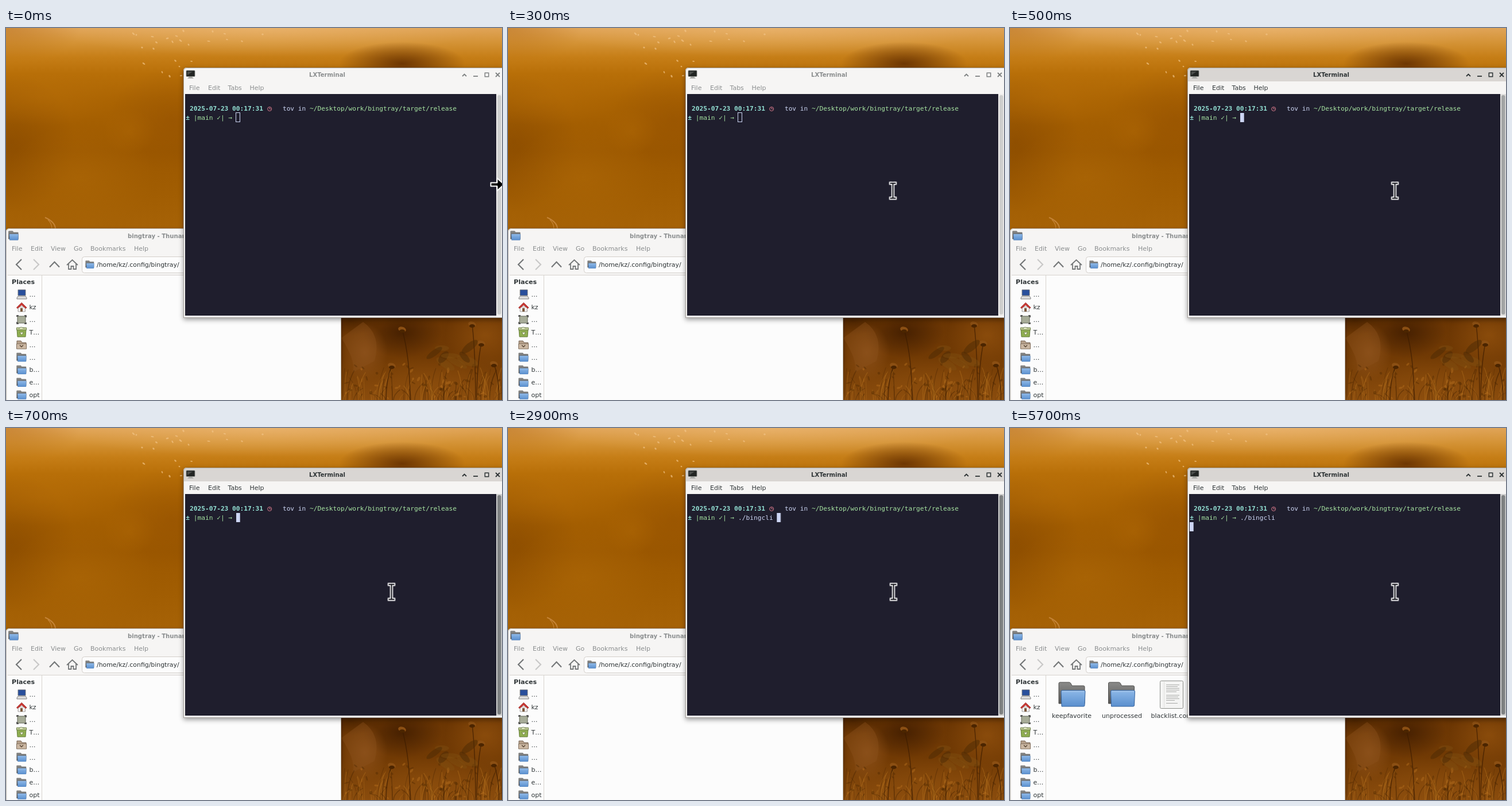
An HTML page with a canvas that plays this animation: 864 px wide and 648 px high, repeating every 8 s.

```html
<!DOCTYPE html>
<html lang="en">
<head>
<meta charset="utf-8">
<title>Desktop with terminal</title>
<style>
html, body { margin: 0; width: 100%; height: 100%; overflow: hidden; background: #a66003; }
canvas, svg { position: absolute; left: 0; top: 0; width: 864px; height: 648px; }
text { font: 11px "DejaVu Sans", sans-serif; fill: #2e3436; white-space: pre; }
.title { font-weight: bold; font-size: 10.1px; }
.head { font-weight: bold; font-size: 11.1px; }
.faded text { fill: #8b8e8f; }
.mono text { font: 11.2px "DejaVu Sans Mono", monospace; fill: #cdd6f4; }
.mono .cyan { fill: #94e2d5; font-weight: bold; }
.mono .green { fill: #a6e3a1; }
.thunar { filter: drop-shadow(0 2px 3px #0005); }
.terminal { filter: drop-shadow(0 3px 4px #0006); }

/* 1% = 80 ms */
.bar, .ink, .inkline, .trough, .slider, .block, .hollow, .start, .typed, .files, .arrow, .beam {
  animation: 8s step-end infinite;
}
.bar { animation-name: bar; }
.ink { animation-name: ink; }
.inkline { animation-name: inkline; fill: none; }
.trough { animation-name: trough; }
.slider { animation-name: slider; }
.hollow { animation-name: hollow; }
.block { animation-name: block; }
.start { animation-name: start; }
.typed { animation-name: typed; }
.files { animation-name: files; }
.arrow { animation-name: arrow; }
.beam { animation-name: beam; }
@keyframes bar { 0% { fill: #f6f5f4 } 5%, to { fill: #d9d6d3 } }
@keyframes ink { 0% { fill: #8b8e8f } 5%, to { fill: #2e3436 } }
@keyframes inkline { 0% { stroke: #7f8283 } 5%, to { stroke: #2e3436 } }
@keyframes trough {
  0% { fill: #efedec } 6.25% { fill: #dedddc } 7.5% { fill: #d2d1d0 } 8.75%, to { fill: #cecece }
}
@keyframes slider {
  0% { fill: #cecfce } 6.25% { fill: #a3a5a5 } 7.5% { fill: #888b8c } 8.75%, to { fill: #7e8182 }
}
@keyframes hollow { 0% { opacity: 1 } 5%, to { opacity: 0 } }
@keyframes block {
  0% { opacity: 0; transform: translate(401px, 148px) }
  5% { opacity: 1; transform: translate(401px, 148px) }
  17.5% { opacity: 1; transform: translate(434.7px, 148px) }
  36.25% { opacity: 1; transform: translate(468.3px, 148px) }
  42.5%, to { opacity: 1; transform: translate(313px, 164px) }
}
@keyframes start { 0% { opacity: 0 } 17.5%, to { opacity: 1 } }
@keyframes typed { 0% { opacity: 0 } 36.25%, to { opacity: 1 } }
@keyframes files { 0% { opacity: 0 } 42.5%, to { opacity: 1 } }
@keyframes arrow { 0% { opacity: 1 } 1.25%, to { opacity: 0 } }
@keyframes beam {
  0% { opacity: 0; transform: translate(786px, 275px) }
  1.25% { opacity: 1; transform: translate(786px, 275px) }
  2.5% { opacity: 1; transform: translate(704px, 281px) }
  3.75% { opacity: 1; transform: translate(670.5px, 283.5px) }
  7.5% { opacity: 1; transform: translate(670.5px, 284.5px) }
  8.75% { opacity: 1; transform: translate(671.5px, 285.5px) }
  71.25%, to { opacity: 1; transform: translate(670.5px, 285.5px) }
}
</style>
</head>
<body>
<canvas id="photo" width="864" height="648"></canvas>
<svg viewBox="0 0 864 648">
  <defs>
    <linearGradient id="blue" x2="0" y2="1">
      <stop stop-color="#8db8e8"/><stop offset="1" stop-color="#5a8fce"/>
    </linearGradient>
    <linearGradient id="grey" x2="0" y2="1">
      <stop stop-color="#8b8b89"/><stop offset="1" stop-color="#555"/>
    </linearGradient>
    <symbol id="folder" viewBox="0 0 48 44">
      <path d="M1 38V3q0-2 2-2h16q2 0 3 2l2 4h20q2 0 2 2v29z" fill="url(#grey)" stroke="#4d4d4b"/>
      <path d="M6 43L5 17q0-2 2-2h38q2 0 2 2l-1 24q0 2-2 2z" fill="url(#blue)" stroke="#34629c"/>
      <path d="M7 17h38" stroke="#b4d1f0" fill="none"/>
    </symbol>
  </defs>

  <g class="thunar">
    <path d="M0 648V355q0-6 6-6H584V648z" fill="#f6f5f4"/>
    <path d="M.5 648V355q0-5.500 6-5.500H583.500V648" fill="none" stroke="#bcb8b3"/>
    <path d="M3 430.500H583V648H3z" fill="#fcfcfc"/>
    <path d="M3 430.500H583M62.500 430V648" stroke="#d7d3cf" fill="none"/>
    <use href="#folder" x="4" y="353" width="18" height="17"/>
    <g class="faded">
      <text class="title" x="212" y="365.500">bingtray - Thunar</text>
      <text x="10" y="387.500">File</text><text x="43" y="387.500">Edit</text>
      <text x="78" y="387.500">View</text><text x="118" y="387.500">Go</text>
      <text x="147" y="387.500">Bookmarks</text><text x="223" y="387.500">Help</text>
    </g>
    <g fill="none" stroke="#747778" stroke-width="2.200">
      <path d="M27 403l-9 9 9 9"/>
      <path d="M48 403l9 9-9 9" stroke="#c9c9c8"/>
      <path d="M76 416.500l8.500-9 8.500 9"/>
      <path d="M106 413l9.500-9 9.500 9M109 411v9h4.500v-5h4v5h4.500v-9" stroke-width="1.800"/>
    </g>
    <rect x="132.500" y="398.500" width="440" height="28" rx="4" fill="#fcfcfc" stroke="#d3cfca"/>
    <use href="#folder" x="138" y="405" width="16" height="14"/>
    <text x="158" y="416" style="font-size:10.900px">/home/kz/.config/bingtray/</text>
    <text class="head" x="10" y="445.500">Places</text>

    <g stroke-width=".9">
      <path d="M21 456h13v10H21z" fill="#284f9c" stroke="#777"/>
      <path d="M19 470l2-3h13l2 3v2H19z" fill="#ddd" stroke="#777"/>
      <path d="M21 486h12.500v8H21z" fill="#f3eeee" stroke="#999"/>
      <path d="M18.500 487l8.700-8.500 8.800 8.500-1.500 1.500-7.300-6-7.200 6z" fill="#cf3b36" stroke="#97211f"/>
      <path d="M25 488h4v6h-4z" fill="#79583d"/>
      <path d="M20 502h14v12H20z" fill="#a7ac98" stroke="#565a4c"/>
      <path d="M19 503v-2h3m10 0h3v3m0 9v2h-3m-10 0h-3v-3" fill="none" stroke="#333" stroke-width="1.500"/>
      <path d="M19 525h16l-1 13H20z" fill="#8fae50" stroke="#5b7330"/>
      <path d="M18.500 522h17v4h-17z" fill="#c2cd97" stroke="#667642"/>
      <path d="M22 524l4-3 6 2M24 530l3 5 4-5z" fill="#eff3dc" stroke="#6d7c48"/>
      <path d="M19 558v-13h7l2 3h7v10z" fill="#b6a08b" stroke="#6f5d4c"/>
      <path d="M18.500 550h17v9h-17z" fill="#cbb7a2" stroke="#7a6755"/>
      <path d="M24 552.500l3 3 3-3" fill="none" stroke="#5c4a3a" stroke-width="1.500"/>
    </g>
    <g id="places"></g>

    <g class="files">
      <use href="#folder" x="84" y="442" width="48" height="44"/>
      <use href="#folder" x="170.500" y="442" width="48" height="44"/>
      <rect x="261.500" y="440.500" width="40" height="48" rx="2" fill="#f4f4f3" stroke="#8c8e8a"/>
      <path d="M268.500 442v45" stroke="#dfdfdd"/>
      <path d="M272 447.500h23m-23 3h20m-20 3h23m-23 3h23m-23 3h18m-18 6h23m-23 3h21m-21 3h23m-23 3h15m-15 5h20"
        stroke="#a9aaa8"/>
      <text x="73" y="504.500">keepfavorite</text>
      <text x="160" y="504.500">unprocessed</text>
      <text x="245.500" y="504.500">blacklist.conf</text>
    </g>
  </g>

  <g class="terminal">
    <path d="M309 505V75q0-6 6-6H870V505z" fill="#f6f5f4"/>
    <path class="bar" d="M309 93V75q0-6 6-6H870V93z"/>
    <path d="M309.500 504.500V75q0-5.500 6-5.500H870M309 504.500H870" fill="none" stroke="#a8a39e"/>
    <rect x="314" y="74" width="15" height="10.500" rx="1" fill="#222523" stroke="#8b8d8a" stroke-width=".8"/>
    <path d="M316 76h9l-9 6z" fill="#4a4d4b"/>
    <path d="M319 85h5l3 3h-11z" fill="#aaaba8"/>
    <text class="title ink" x="528" y="85.300">LXTerminal</text>
    <g class="inkline" stroke-width="1.800">
      <path d="M795 84l3.500-3.500 3.500 3.500"/>
      <path d="M814 84h8"/>
      <path d="M834.300 78.300h6.400v6.400h-6.400z" stroke-width="1.500"/>
      <path d="M853 78l7 7m0-7l-7 7"/>
    </g>
    <text class="ink" x="319" y="107.500">File</text>
    <text class="ink" x="352" y="107.500">Edit</text>
    <text class="ink" x="386.500" y="107.500">Tabs</text>
    <text class="ink" x="424.500" y="107.500">Help</text>
    <rect x="312" y="115" width="542" height="386" fill="#1f1e2d"/>
    <rect class="trough" x="854" y="115" width="10" height="386"/>
    <rect class="slider" x="856" y="117" width="6.500" height="382" rx="3.200"/>
    <g class="mono">
      <text class="cyan" x="320" y="144.300">2025-07-23 00:17:31</text>
      <g fill="none" stroke="#d97a8c" stroke-width="1">
        <circle cx="459.200" cy="141" r="3.500"/><path d="M459.200 138.500v2.500h2"/>
      </g>
      <text x="481.900" y="144.300">tov in</text>
      <text class="green" x="529.100" y="144.300">~/Desktop/work/bingtray/target/release</text>
      <text class="cyan" x="313.300" y="160.300">±</text>
      <text class="green" x="326.800" y="160.300">|main</text>
      <text class="green" x="367.200" y="160.300">✓</text>
      <text class="green" x="374" y="160.300">|</text>
      <text class="green" x="387.500" y="160.300">→</text>
      <text class="start" x="401" y="160.300">./bin</text>
      <text class="typed" x="434.700" y="160.300">gcli</text>
    </g>
    <rect class="hollow" x="400.500" y="147.500" width="7" height="16" fill="none" stroke="#cdd6f4"/>
    <rect class="block" width="6.700" height="16" fill="#cdd6f4"/>
  </g>

  <path class="arrow" d="M844.500 269.500h11v-8l12 11-12 11v-8h-11z"
    stroke="#fff" stroke-width="2" stroke-linejoin="round"/>
  <g class="beam" fill="none" stroke-linecap="square">
    <path id="ibeam" d="M-4-13h2.500q1.500 0 1.500 1.500v23q0 1.500-1.500 1.500H-4M4-13H1.500Q0-13 0-11.500M4 13H1.500Q0 13 0 11.500"
      stroke="#fff" stroke-width="4.800"/>
    <use href="#ibeam"/>
    <path d="M-4-13h8M0-13v26M-4 13h8" stroke="#111119" stroke-width="1.900"/>
  </g>
</svg>
<script>
const ctx = document.getElementById('photo').getContext('2d');
let seed = 7;
const rand = (a = 0, b = 1) => {
  seed = (seed * 16807) % 2147483647;
  return a + (b - a) * seed / 2147483647;
};

function fade(y0, y1, stops) {
  const g = ctx.createLinearGradient(0, y0, 0, y1);
  stops.forEach(([p, c]) => g.addColorStop(p, c));
  return g;
}

// Soft ellipse; rgb is "r,g,b"
function glow(x, y, rx, ry, rgb, alpha) {
  ctx.save();
  ctx.translate(x, y);
  ctx.scale(rx, ry);
  const g = ctx.createRadialGradient(0, 0, 0, 0, 0, 1);
  g.addColorStop(0, `rgba(${rgb},${alpha})`);
  g.addColorStop(.5, `rgba(${rgb},${alpha * .5})`);
  g.addColorStop(1, `rgba(${rgb},0)`);
  ctx.fillStyle = g;
  ctx.fillRect(-1, -1, 2, 2);
  ctx.restore();
}

function dot(x, y, rx, ry, turn, color) {
  ctx.fillStyle = color;
  ctx.beginPath();
  ctx.ellipse(x, y, rx, ry, turn, 0, 7);
  ctx.fill();
}

function stalk(x, y, dx, dy, width, color) {
  ctx.strokeStyle = color;
  ctx.lineWidth = width;
  ctx.beginPath();
  ctx.moveTo(x, y);
  ctx.quadraticCurveTo(x, y + dy * .6, x + dx, y + dy);
  ctx.stroke();
}

function drawSky() {
  ctx.fillStyle = fade(0, 360, [
    [0, '#e0a458'], [.07, '#d49336'], [.14, '#c67e17'], [.22, '#b86f08'],
    [.36, '#aa6302'], [.6, '#9c5800'], [.8, '#a15d02'], [1, '#a76307']
  ]);
  ctx.fillRect(0, 0, 864, 360);
  glow(450, 0, 380, 50, '245,196,132', .4);
  glow(0, 0, 130, 60, '170,95,10', .4);
  glow(690, 62, 110, 38, '96,44,0', .85);
  glow(10, 200, 110, 120, '125,66,0', .45);
  glow(290, 160, 110, 90, '140,74,0', .4);
  glow(130, 260, 130, 90, '176,106,8', .5);
  glow(215, 180, 45, 40, '178,106,6', .4);
  glow(60, 120, 140, 50, '186,112,10', .4);
  const sparks = [
    227, 12, 237, 34, 257, 36, 262, 25, 255, 15, 281, 18, 290, 24, 297, 14, 304, 22,
    309, 5, 318, 29, 323, 58, 272, 77, 285, 84, 302, 67, 305, 83, 353, 23, 360, 6,
    381, 10, 385, 20, 411, 23, 447, 11, 240, 62, 295, 57, 222, 10
  ];
  for (let i = 0; i < sparks.length; i += 2)
    dot(sparks[i], sparks[i + 1], rand(1.4, 3), rand(.9, 1.6), rand(-.4, 1.2), '#f2c487b0');
  stalk(86, 350, -18, -20, 2, '#d39450aa');
  stalk(80, 350, -7, -16, 1.2, '#d39450aa');
}

function drawMeadow() {
  ctx.fillStyle = fade(500, 648, [[0, '#6a3503'], [.5, '#713a04'], [.8, '#80450a'], [1, '#8a4c0d']]);
  ctx.fillRect(580, 500, 284, 148);
  glow(690, 530, 70, 45, '58,25,0', .75);
  glow(600, 510, 60, 25, '62,28,0', .6);
  glow(835, 535, 70, 60, '156,88,16', .6);
  glow(625, 565, 40, 50, '160,96,40', .55);
  glow(740, 620, 130, 50, '150,84,14', .4);
  ctx.fillStyle = '#8a511c66';
  ctx.beginPath();
  ctx.moveTo(584, 540);
  ctx.quadraticCurveTo(610, 580, 604, 600);
  ctx.lineTo(642, 580);
  ctx.quadraticCurveTo(655, 535, 622, 512);
  ctx.fill();
  for (let i = 0; i < 110; i++) {
    const dark = i % 2;
    stalk(rand(584, 864), 650, rand(-16, 16), -rand(12, 60), rand(.7, 1.6), dark ? '#42200066' : '#b8752166');
  }
  for (let i = 0; i < 60; i++)
    dot(rand(584, 864), rand(585, 645), rand(2, 5), rand(1, 2.5), rand(0, 3), i % 3 ? '#4d270166' : '#b36e1e77');
  // Tall plants with flower heads
  for (const [x, y, lean] of [[690, 525, -14], [828, 549, 8], [812, 516, -6], [672, 588, 10], [850, 585, -9]]) {
    stalk(x - lean, 650, lean, y - 650, 1.5, '#3b1b00aa');
    dot(x, y, 7, 4.500, .3, '#8b4f13');
    dot(x, y + 3, 5, 3, 0, '#4b2500');
  }
  // Broad leaves
  for (let i = 0; i < 9; i++)
    dot(rand(735, 810), rand(548, 595), rand(12, 22), rand(4, 8), rand(-.9, .9), i % 2 ? '#4f2b0588' : '#80501366');
}

const places = ['…', 'kz', '…', 'T…', '…', '…', 'b…', 'e…', 'opt'];
document.getElementById('places').innerHTML = places.map((name, i) => {
  const y = 464 + i * 21.9;
  const icon = i > 4 ? `<use href="#folder" x="18" y="${y - 8}" width="18" height="16"/>` : '';
  return `${icon}<text x="40.500" y="${y + 4}">${name}</text>`;
}).join('');

drawSky();
drawMeadow();
</script>
</body>
</html>
```
